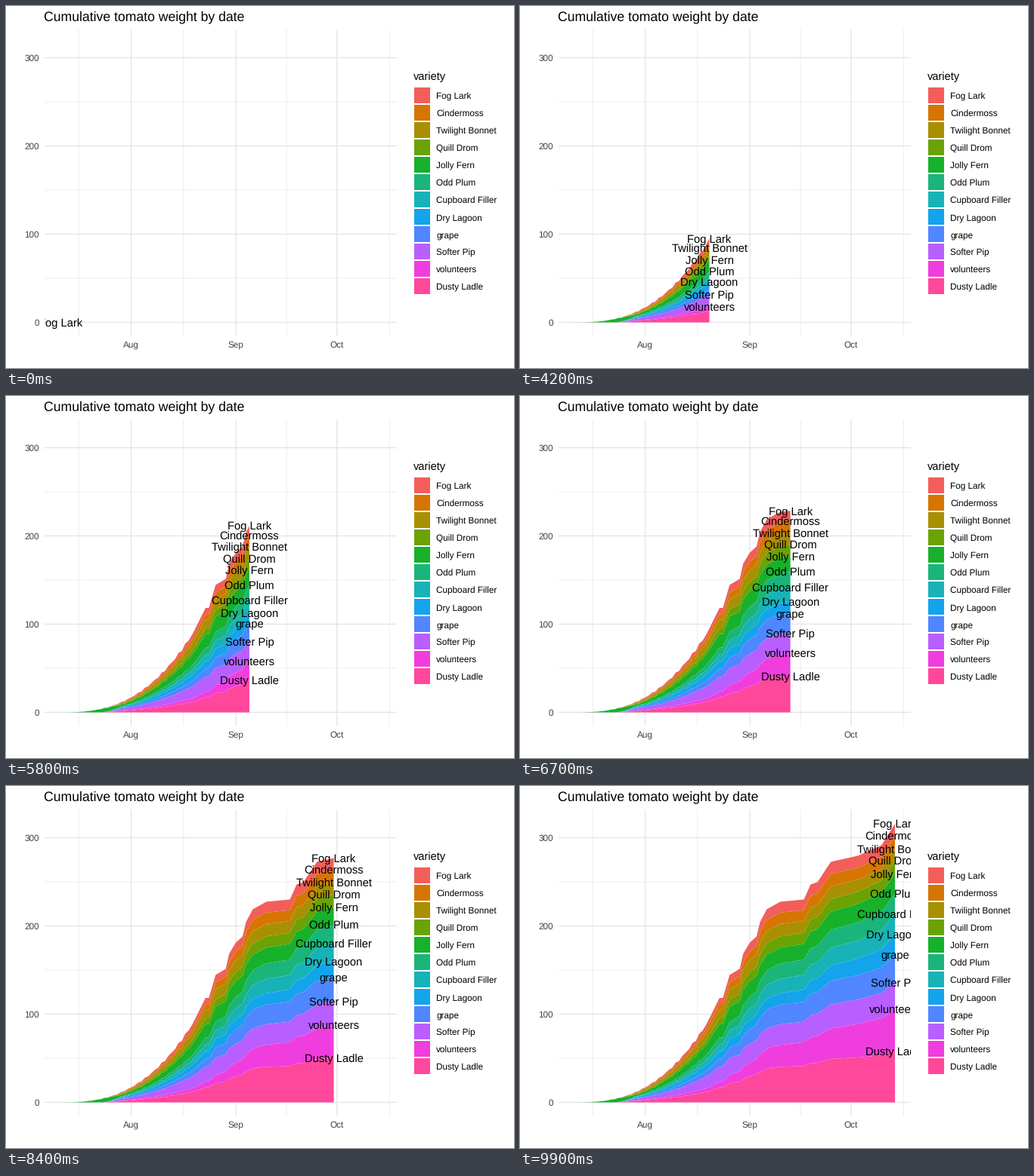
Write a matplotlib script that moves like this. It is 672x480 px and loops after 10 s.

```python
import numpy as np
import matplotlib.pyplot as plt
from matplotlib.animation import FuncAnimation
from matplotlib.patches import Rectangle

W, H, DPI = 672, 480, 96
FRAMES, LAST_DAY = 100, 95
LEFT, RIGHT, TOP, BOTTOM = 50.8, 517, 31.3, 437.6
BASE, UNIT = 419.5, 1.17          # y of zero, pixels per unit of weight
X0, DAY = 71.9, 4.465             # x of the first day, pixels per day
LABEL_SIZE = 11.04
MIN_GAP, MIN_BAND = 11.5, 3       # labels too close or on thin bands are dropped
GRID, AXIS_TEXT = "#E6E6E6", "#444444"

# Name, colour and percent of the harvest on each of SHARE_DAYS
SHARE_DAYS = (40, 58, 95)
VARIETIES = [
    ("Fog Lark", "#F35E5A", (6, 5.5, 4.5)),
    ("Cindermoss", "#D67502", (5, 5.7, 4.5)),
    ("Twilight Bonnet", "#A89002", (9, 6.4, 4.3)),
    ("Quill Drom", "#6BA204", (5.5, 5.8, 4.6)),
    ("Jolly Fern", "#17B12B", (14, 7.9, 7.3)),
    ("Odd Plum", "#1AB57A", (6.4, 7.7, 7.2)),
    ("Cupboard Filler", "#17B3B7", (6, 7.2, 7.4)),
    ("Dry Lagoon", "#13A4EC", (7.7, 5.5, 7.3)),
    ("grape", "#5086FF", (7.3, 9.8, 9.9)),
    ("Softer Pip", "#B95EFF", (15, 10.3, 9.7)),
    ("volunteers", "#F03EDE", (4.5, 10.6, 14.9)),
    ("Dusty Ladle", "#FF479C", (13.6, 17.7, 18.4)),
]
NAMES, COLORS, SHARES = zip(*VARIETIES)
EARLIEST = NAMES.index("Jolly Fern")

# (day, height in pixels) of the whole stack at the big pickings
PICKINGS = [(43, 138.5), (44, 138.5), (46, 169), (49, 177), (50, 197),
            (52, 212), (54, 220), (55, 239), (57, 256), (61, 266), (68, 269),
            (70, 289), (72, 292), (76, 319), (84, 327), (91, 341), (95, 369.5)]

days = np.arange(LAST_DAY + 1)


def total_height():
    """Power-law growth with a picking rhythm, then the big pickings."""
    early = days[days <= 40]
    rhythm = early - .3 * np.sin(2.6 * (early - 18.5))
    growth = 110 * (np.maximum(rhythm, 0) / 40) ** 2.65
    late_days, late = zip(*PICKINGS)
    return np.interp(days, np.append(early, late_days), np.append(growth, late))


def stack_edges():
    """Top edge of every band (top band first) on each day, plus the zero line."""
    share = np.array([np.interp(days, SHARE_DAYS, s) for s in SHARES])
    share /= share.sum(axis=0)
    ripe = np.clip((days - 12) / 6, 0, 1)
    share *= ripe
    share[EARLIEST] += 1 - ripe
    tops = np.cumsum(share[::-1], axis=0)[::-1] * total_height()
    return np.vstack([tops, np.zeros(len(days))])


EDGES = stack_edges()


def day_at(i):
    """Whole days snap to frames; the frames left over fall between two days."""
    return np.interp(i, np.rint(days * (FRAMES - 1) / LAST_DAY), days)


plt.rcParams.update({"font.family": "Liberation Sans", "text.hinting": "none"})
fig = plt.figure(figsize=(W / DPI, H / DPI), dpi=DPI, facecolor="white")
ax = fig.add_axes([0, 0, 1, 1])
ax.set(xlim=(0, W), ylim=(H, 0), autoscale_on=False)
ax.axis("off")
panel = Rectangle((LEFT, TOP), RIGHT - LEFT, BOTTOM - TOP, fc="none", ec="none")
ax.add_patch(panel)


def date_x(day):
    return X0 + DAY * day


def weight_y(weight):
    return BASE - UNIT * weight


def baseline(y, size):
    """Baseline that centres capitals on y."""
    return y + .36 * size * DPI / 72


def write(x, y, s, size, color="black", ha="left", **kw):
    return ax.text(x, baseline(y, size), s, size=size, color=color,
                   ha=ha, va="baseline", **kw)


def grid(xs, ys, width):
    style = dict(color=GRID, lw=width * 72 / DPI, zorder=0, snap=False)
    ax.vlines(xs, TOP, BOTTOM, **style)
    ax.hlines(ys, LEFT, RIGHT, **style)


months = {"Aug": 21, "Sep": 52, "Oct": 82}
weights = np.arange(0, 301, 100)
grid([date_x(d) for d in (5.5, 36.5, 67, 97.5)], weight_y(weights[:-1] + 50), .71)
grid([date_x(d) for d in months.values()], weight_y(weights), 1.42)
for name, d in months.items():
    write(date_x(d), 448.3, name, 8.8, AXIS_TEXT, "center")
for v in weights:
    write(44, weight_y(v) + .3, str(v), 8.8, AXIS_TEXT, "right")

write(50.5, 13.2, "Cumulative tomato weight by date", 13.2)
write(538.5, 92.8, "variety", 11)
for k, (name, color) in enumerate(zip(NAMES, COLORS)):
    y = 108 + 23 * k
    ax.add_patch(Rectangle((540, y), 21, 21, fc=color, lw=0))
    write(569.3, y + 11, name, 8.8)

areas = [ax.fill([0], [0], color=c, lw=0, zorder=2)[0] for c in COLORS]
labels = [write(0, 0, n, LABEL_SIZE, ha="center", clip_on=True, zorder=5)
          for n in NAMES]
for t in labels:
    t.set_clip_path(panel)


def draw(i):
    day = day_at(i)
    now = np.array([np.interp(day, days, e) for e in EDGES])
    past = days < day
    xs = date_x(np.append(days[past], day))
    ys = BASE - np.column_stack([EDGES[:, past], now])
    around = np.append(xs, xs[::-1])
    for k, area in enumerate(areas):
        area.set_xy(np.column_stack([around, np.append(ys[k], ys[k + 1][::-1])]))
        area.set_visible(day > 0)

    last = -np.inf
    for k, t in enumerate(labels):
        y = BASE - now[k]
        thick = k == 0 or now[k] - now[k + 1] >= MIN_BAND
        show = thick and y - last >= MIN_GAP
        t.set_visible(show)
        if show:
            t.set_position((date_x(day), baseline(y, LABEL_SIZE)))
            last = y
    return areas + labels


anim = FuncAnimation(fig, draw, frames=FRAMES, interval=100, repeat=True,
                     repeat_delay=0, blit=False)
plt.show()
```
